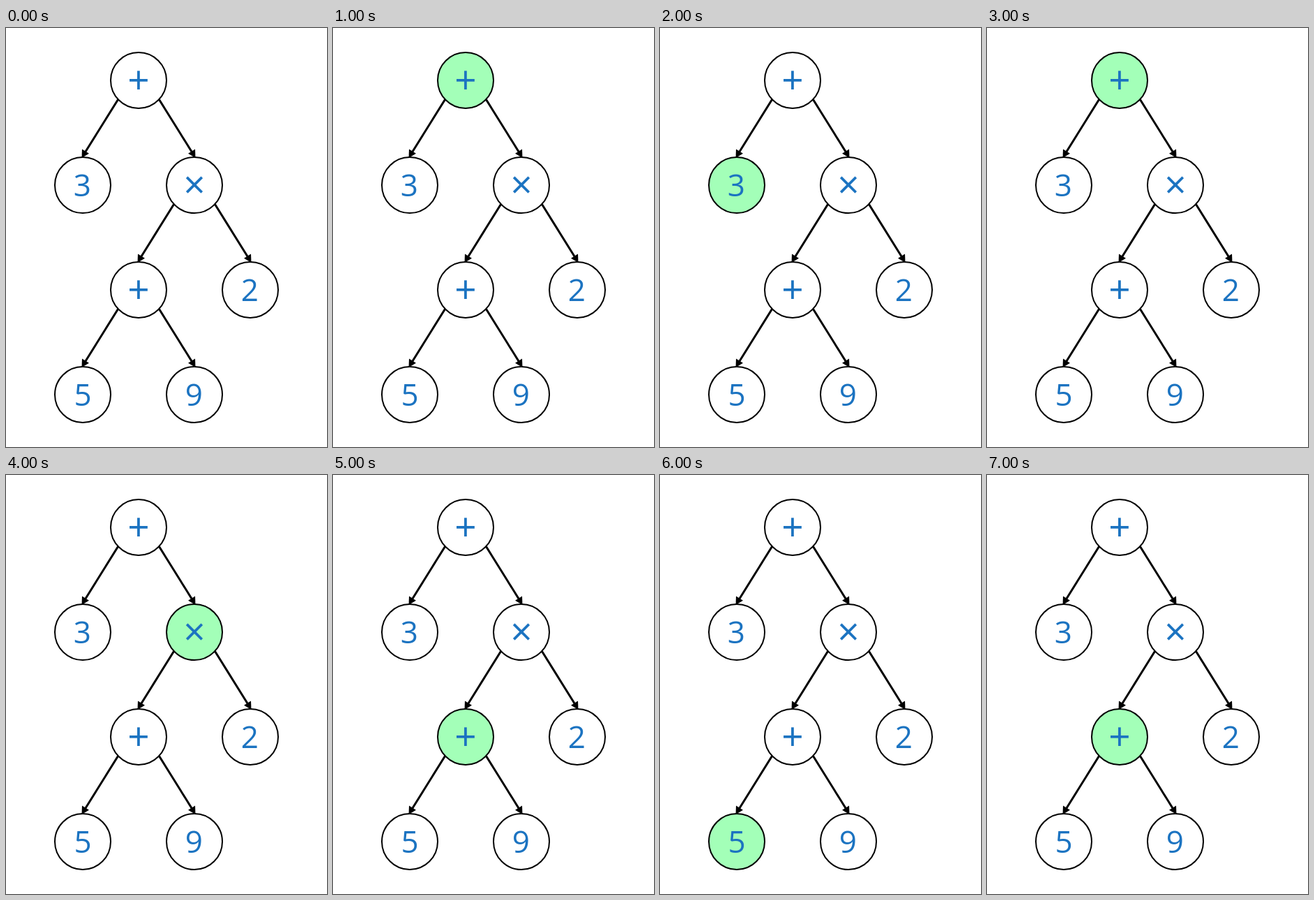
Animation, 460 px wide and 600 px high, one loop 8 s. Source, as an HTML page:

```html
<!DOCTYPE html>
<html lang="en">
<head>
<meta charset="utf-8">
<title>In-order tree traversal</title>
<style>
  html, body { margin: 0; width: 100%; height: 100%; overflow: hidden; background: #fff; }
  svg { display: block; width: 460px; height: 600px; }
  circle { fill: #fff; stroke: #000; stroke-width: 2; }
  text { fill: #1b73c1; font: 44px "Open Sans", "Noto Sans", sans-serif; text-anchor: middle; }
  .op { font-size: 55px; }
  .edge { fill: none; stroke: #000; stroke-width: 3; }

  /* Negative delays place each visit in the 8 s loop. */
  .once { animation: once 8s step-end var(--delay) infinite; }
  .twice { animation: twice 8s step-end var(--delay) infinite; }
  @keyframes once {
    0% { fill: #a3ffb8; }
    12.5%, 100% { fill: #fff; }
  }
  @keyframes twice {
    0%, 25% { fill: #a3ffb8; }
    12.5%, 37.5%, 100% { fill: #fff; }
  }
</style>
</head>
<body>
<svg viewBox="0 0 460 600">
  <defs>
    <g id="left">
      <path class="edge" d="M-29.5 27.5L-76 102"/>
      <path d="M-81.5 111L-81 98.5L-71 104.7Z"/>
    </g>
    <g id="branches">
      <use href="#left"/>
      <use href="#left" transform="scale(-1 1)"/>
    </g>
  </defs>

  <g transform="translate(190 75)">
    <circle r="40" class="twice" style="--delay:-7s"/>
    <text class="op" y="19.4">+</text>
  </g>
  <g transform="translate(110 225)">
    <circle r="40" class="once" style="--delay:-6s"/>
    <text x="-.7" y="16">3</text>
  </g>
  <g transform="translate(270 225)">
    <circle r="40" class="once" style="--delay:-4s"/>
    <text class="op" y="19.4">×</text>
  </g>
  <g transform="translate(190 375)">
    <circle r="40" class="twice" style="--delay:-3s"/>
    <text class="op" y="19.4">+</text>
  </g>
  <g transform="translate(350 375)">
    <circle r="40"/>
    <text x="-.7" y="16">2</text>
  </g>
  <g transform="translate(110 525)">
    <circle r="40" class="once" style="--delay:-2s"/>
    <text y="16">5</text>
  </g>
  <g transform="translate(270 525)">
    <circle r="40"/>
    <text x="-.7" y="16">9</text>
  </g>

  <use href="#branches" x="190" y="75"/>
  <use href="#branches" x="270" y="225"/>
  <use href="#branches" x="190" y="375"/>
</svg>
</body>
</html>
```
